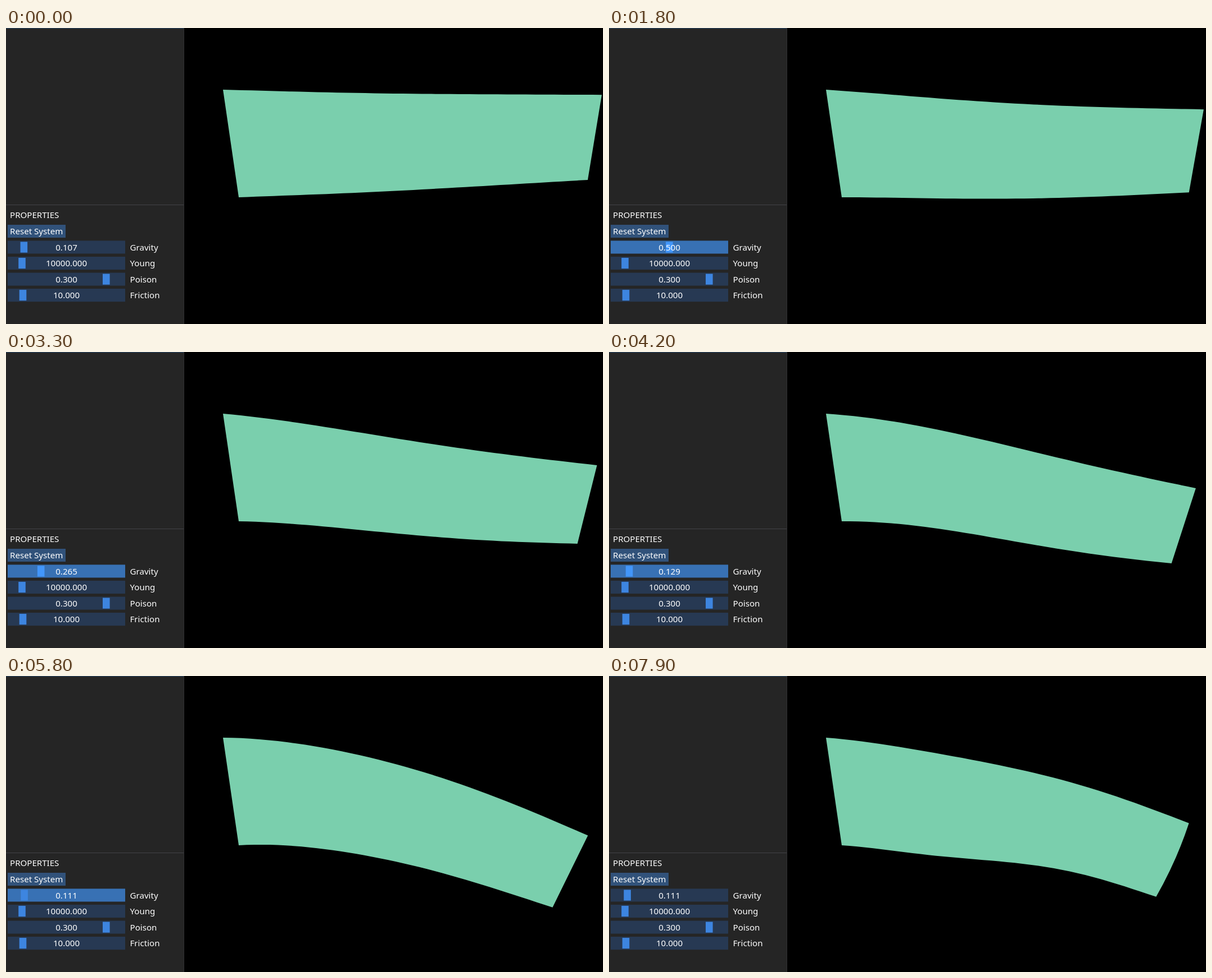
Animation of 1062 by 528 pixels, one loop 8 s. Source, as an HTML page:

```html
<!DOCTYPE html>
<html lang="en">
<head>
<meta charset="utf-8">
<title>Soft body</title>
<style>
  html, body { margin: 0; width: 100%; height: 100%; overflow: hidden; background: #000; }
  svg { display: block; }
  text { font: 15.1px "Noto Sans", "Open Sans", sans-serif; fill: #fff; }
  .value { text-anchor: middle; }
</style>
</head>
<body>
<svg id="stage" width="1062" height="528" viewBox="0 0 1062 528"></svg>
<script>
const LOOP = 8000, STEP = 100, PARTS = 40;
const FRAME = '#273953', HOVER = '#31527a', ACTIVE = '#3871b4';
const GRAB = '#3d85e0', GRAB_ACTIVE = '#4296fa';
const { PI, sin, max, min } = Math;

// Amplitudes of the beam's bending modes: time, sag, bow, ripple.
const BEND = [
  [0, 9.2, 4.4, 0.5],
  [1000, 18.3, 7.5, -0.6],
  [2500, 56, 18, 1],
  [4200, 133, 16.7, -1.5],
  [5800, 174.5, -2.5, 2],
  [6700, 178.6, 0.3, 2],
  [7200, 178.4, 0.5, 2.2],
  [7900, 152.5, 4.5, 5.4]
];
const GRAVITY = [[1200, .107], [1800, .5], [2500, .503], [3600, .182], [4200, .129], [4800, .111]];

// Smooth curve through one column of timed rows.
function ease(rows, col, t) {
  const last = rows.length - 1;
  t = min(max(t, rows[0][0]), rows[last][0]);
  let i = 0;
  while (i < last - 1 && t >= rows[i + 1][0]) i++;
  const slope = k => {
    const a = rows[max(k - 1, 0)], b = rows[min(k + 1, last)];
    return (b[col] - a[col]) / (b[0] - a[0]);
  };
  const [p, q] = [rows[i], rows[i + 1]];
  const h = q[0] - p[0], u = (t - p[0]) / h, v = 1 - u;
  return p[col] * v * v * (1 + 2 * u) + q[col] * u * u * (3 - 2 * u)
    + h * u * v * (slope(i) * v - slope(i + 1) * u);
}

function bodyPath(t) {
  const [sag, bow, ripple] = [1, 2, 3].map(col => ease(BEND, col, t));
  const kick = max(0, ripple - 2);
  const cantilever = s => s * s * (3 - s) / 2;
  const endSlope = 1.5 * sag - PI * bow + 2 * PI * ripple;
  const topX = 1060.3 - sag * sag / 1200 - 0.1 * bow - 2.6 * kick;
  const bottomX = topX - 24.5 - 0.136 * endSlope;

  const top = s => [386 + (topX - 386) * s,
    110 + sag * cantilever(s) + bow * sin(PI * s) + ripple * sin(2 * PI * s)];
  const bottom = s => [414 + (bottomX - 414) * s,
    302 - 39 * s + (1 - 0.142 * s) * sag * cantilever(s) + 0.85 * bow * sin(PI * s)
    + (ripple + 1.35 * kick) * sin(2 * PI * s)];

  const trace = edge => Array.from({ length: PARTS + 1 }, (_, k) => edge(k / PARTS));
  const line = pts => pts.map(p => p.map(n => n.toFixed(2)).join(' ')).join('L');
  const [ax, ay] = top(1), [bx, by] = bottom(1);
  return `M${line(trace(top))}Q${(ax + bx) / 2 + 2.3 * kick} ${(ay + by) / 2} `
    + `${line(trace(bottom).reverse())}Z`;
}

const stage = document.getElementById('stage');
function add(tag, attrs, text) {
  const el = document.createElementNS('http://www.w3.org/2000/svg', tag);
  for (const k in attrs) el.setAttribute(k, attrs[k]);
  if (text) el.textContent = text;
  return stage.appendChild(el);
}
const box = (x, y, width, height, fill) => add('rect', { x, y, width, height, fill });
const label = (x, y, text, cls = '') => add('text', { x, y, class: cls }, text);

function slider(row, name, value, grabX) {
  const y = 379.4 + 28.55 * row;
  const bar = box(3, y, 209, 23.1, FRAME);
  const grab = box(grabX, y + 2, 12.6, 19.2, GRAB);
  const text = label(107.5, y + 17.4, value, 'value');
  label(220.5, y + 17.4, name);
  return { bar, grab, text };
}

box(0, 0, 316, 528, '#252525');
box(316, 0, 1, 528, '#303033');
box(0, 0, 316, 1, '#23415f');
box(0, 315, 316, 1, '#434347');
label(7, 339, 'PROPERTIES');
box(3, 351, 103, 23, HOVER);
label(7, 368.3, 'Reset System');
const gravity = slider(0, 'Gravity', '0.107', 25.5);
const young = slider(1, 'Young', '10000.000', 22.2);
slider(2, 'Poison', '0.300', 172);
slider(3, 'Friction', '10.000', 23.7);
const body = add('path', { fill: '#7acfad' });

function draw(t) {
  const g = ease(GRAVITY, 1, t);
  const within = (a, b) => t >= a && t < b;
  gravity.bar.setAttribute('fill',
    within(1200, 5900) ? ACTIVE : within(500, 6000) ? HOVER : FRAME);
  gravity.grab.setAttribute('fill', within(1200, 5800) ? GRAB_ACTIVE : GRAB);
  gravity.grab.setAttribute('x', 5 + 192 * g);
  gravity.text.textContent = g.toFixed(3);
  young.bar.setAttribute('fill', within(6000, 6200) ? HOVER : FRAME);
  body.setAttribute('d', bodyPath(t));
}

const start = performance.now();
function tick() {
  const t = (performance.now() - start) % LOOP;
  draw(Math.floor(t / STEP) * STEP);
  requestAnimationFrame(tick);
}
tick();
</script>
</body>
</html>
```
